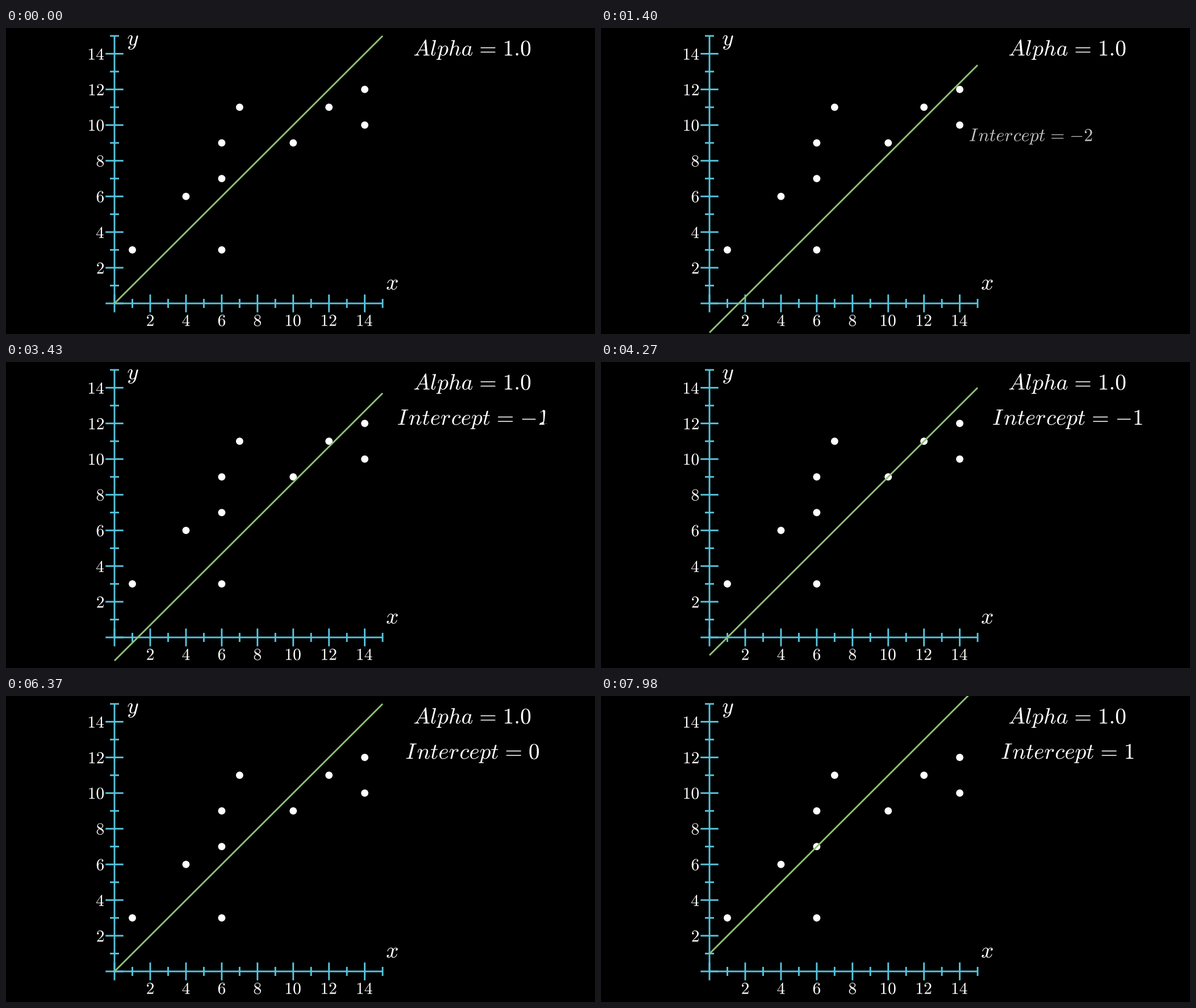
Animation of 1037x540 px, one loop 8000 ms. Source, as a matplotlib script:

```python
import math

import matplotlib.pyplot as plt
import numpy as np
from matplotlib.animation import FuncAnimation
from matplotlib.collections import LineCollection
from matplotlib.patches import Circle, PathPatch
from matplotlib.path import Path
from matplotlib.textpath import text_to_path

W, H, DPI = 1037, 540, 64
LOOP, INTERVAL, STEP = 8000, 20, 70          # ms
FIRST, PERIOD, DURATION = 720, 2100, 1050    # ms
ORIGIN = np.array([191, 486])
UNIT = 31.47
BLUE, GREEN = "#58c4dd", "#90c078"
POINTS = [(1, 3), (4, 6), (6, 3), (6, 7), (6, 9),
          (7, 11), (10, 9), (12, 11), (14, 10), (14, 12)]
BIG, SMALL = 39.3, 29.5                      # em sizes in px
GROW_FROM = np.array([466, 599])
SAMPLES = 300

plt.rcParams["mathtext.fontset"] = "cm"
fig = plt.figure(figsize=(W / DPI, H / DPI), dpi=DPI, facecolor="black")
ax = fig.add_axes([0, 0, 1, 1])
ax.set(xlim=(0, W), ylim=(H, 0))
ax.axis("off")


def px(width):
    return width * 72 / DPI


def to_stage(x, y):
    return ORIGIN + UNIT * np.array([x, -y])


def smooth(t):
    """Sigmoid easing, normalised to run from 0 to 1."""
    def sigmoid(v):
        return 1 / (1 + math.exp(-v))
    t = min(max(t, 0), 1)
    edge = sigmoid(-5)
    return min(max((sigmoid(10 * (t - 0.5)) - edge) / (1 - 2 * edge), 0), 1)


# Glyph outlines: a glyph is a list of contours, each with SAMPLES points.

def bezier(ctrl, t):
    d = len(ctrl) - 1
    return sum(math.comb(d, j) * (1 - t) ** (d - j) * t ** j * np.asarray(p)
               for j, p in enumerate(ctrl))


def sample(curves):
    u = np.arange(SAMPLES) * len(curves) / SAMPLES
    return np.array([bezier(curves[int(v)], v - int(v)) for v in u])


def outline(verts, codes):
    contours = []
    for pts, code in Path(verts, codes).iter_segments(simplify=False):
        pts = np.reshape(pts, (-1, 2))
        if code == Path.MOVETO:
            start = pen = pts[0]
            contours.append([])
        elif code == Path.CLOSEPOLY:
            if not np.allclose(pen, start):
                contours[-1].append([pen, start])
            pen = start
        elif code != Path.STOP:
            contours[-1].append([pen, *pts])
            pen = pts[-1]
    return [sample(c) for c in contours if c]


def layout(tex, size):
    """Glyphs of a formula, y down, baseline at zero."""
    info, shapes, _ = text_to_path.get_glyphs_mathtext(
        ax.title.get_fontproperties(), f"${tex}$")
    flip = np.array([1, -1]) * size / text_to_path.FONT_SCALE
    glyphs = []
    for name, x, y, scale in info:
        verts, codes = shapes[name]
        contours = outline(verts, codes)
        glyphs.append([(c * scale + [x, y]) * flip for c in contours])
    return glyphs


def place(glyphs, x, y, fx=0.5, fy=None):
    """Anchor the ink box at fractions fx, fy; without fy, y is the baseline."""
    points = np.concatenate([c for g in glyphs for c in g])
    lo, hi = points.min(axis=0), points.max(axis=0)
    dx = x - (lo[0] + fx * (hi[0] - lo[0]))
    dy = y - (lo[1] + fy * (hi[1] - lo[1])) if fy is not None else y - glyphs_base
    return [[c + [dx, dy] for c in g] for g in glyphs]


glyphs_base = 0


def to_path(glyphs):
    return Path.make_compound_path(
        *[Path(np.vstack([c, c[:1]]), closed=True) for g in glyphs for c in g])


def add_glyphs(glyphs, zorder=3):
    return ax.add_patch(PathPatch(to_path(glyphs), fc="white", lw=0, ec="none",
                                  zorder=zorder))


def blend(a, b, t):
    """Morph one glyph into another; a missing contour grows from a point."""
    n = max(len(a), len(b))

    def pad(g):
        return g + [np.tile(g[-1][-1], (SAMPLES, 1))] * (n - len(g))
    return [(1 - t) * p + t * q for p, q in zip(pad(a), pad(b))]


def morph(src, dst, t):
    """Pair glyphs in order; where dst is short, a repeat fades away."""
    n = len(src)
    picks = [i * len(dst) // n for i in range(n)]
    solid, ghost = [], []
    for i, k in enumerate(picks):
        repeated = i > 0 and k == picks[i - 1]
        (ghost if repeated else solid).append(blend(src[i], dst[k], t))
    return solid, ghost


# Axes with ticks and numbers.
segments = [[to_stage(0, 0), to_stage(15, 0)], [to_stage(0, 0), to_stage(0, 15)]]
for v in range(16):
    half = 8 if v % 2 else 15.7
    for centre, way in ((to_stage(v, 0), [0, half]), (to_stage(0, v), [half, 0])):
        segments.append([centre - way, centre + way])
ax.add_collection(LineCollection(segments, colors=BLUE, linewidths=px(2.9),
                                 snap=False, zorder=1))

static = []
for v in range(2, 15, 2):
    number = layout(str(v), SMALL)
    static += place(number, to_stage(v, 0)[0], 506, 0.5, 0)
    static += place(number, 172, to_stage(0, v)[1] + 0.5, 1, 0.5)
static += place(layout("x", BIG), 680, 453, 0.5, 0.5)
static += place(layout("y", BIG), 223.5, 25.5, 0.5, 0.5)

# Small spaces bring mathtext up to the usual TeX spacing.
EQUALS = r"\hspace{0.116}=\hspace{0.116}"
static += place(layout(r"Al\hspace{0.022}pha" + EQUALS + "1.0", BIG), 821, 48.7)
add_glyphs(static)

labels = [place(layout(r"I\hspace{0.089}nter\hspace{0.032}cept" + EQUALS + value,
                       BIG), 821.3, 111)
          for value in ("{-}2", "{-}1", "0", "1")]

for p in POINTS:
    ax.add_patch(Circle(to_stage(*p), 6.4, fc="white", lw=0, zorder=2))

fit_line, = ax.plot([], [], color=GREEN, lw=px(2.9), zorder=4,
                    solid_capstyle="butt")
label = add_glyphs(labels[0], zorder=5)
fading = add_glyphs(labels[0], zorder=5)


def show(patch, glyphs, alpha=1.0):
    patch.set_visible(bool(glyphs) and alpha > 0)
    if patch.get_visible():
        patch.set_path(to_path(glyphs))
        patch.set_alpha(alpha)


def update(i):
    t = (i * INTERVAL + INTERVAL // 2) // STEP * STEP
    progress = [smooth((t - FIRST - k * PERIOD) / DURATION) for k in range(4)]

    intercept = -2 * progress[0] + sum(progress[1:])
    ends = np.array([to_stage(x, x + intercept) for x in (0, 15)])
    fit_line.set_data(ends[:, 0], ends[:, 1])

    stage = (t - FIRST) // PERIOD
    if stage < 0:
        solid, ghost, a, alpha = [], [], 0, 0
    elif stage == 0:
        a = progress[0]
        solid = [[GROW_FROM + a * (c - GROW_FROM) for c in g] for g in labels[0]]
        ghost, alpha = [], a ** 1.4
    else:
        a, alpha = progress[stage], 1
        solid, ghost = morph(labels[stage - 1], labels[stage], a)
    show(label, solid, alpha)
    show(fading, ghost, 1 - a)
    return fit_line, label, fading


anim = FuncAnimation(fig, update, frames=LOOP // INTERVAL, interval=INTERVAL,
                     repeat=True, repeat_delay=0, blit=False)
plt.show()
```
